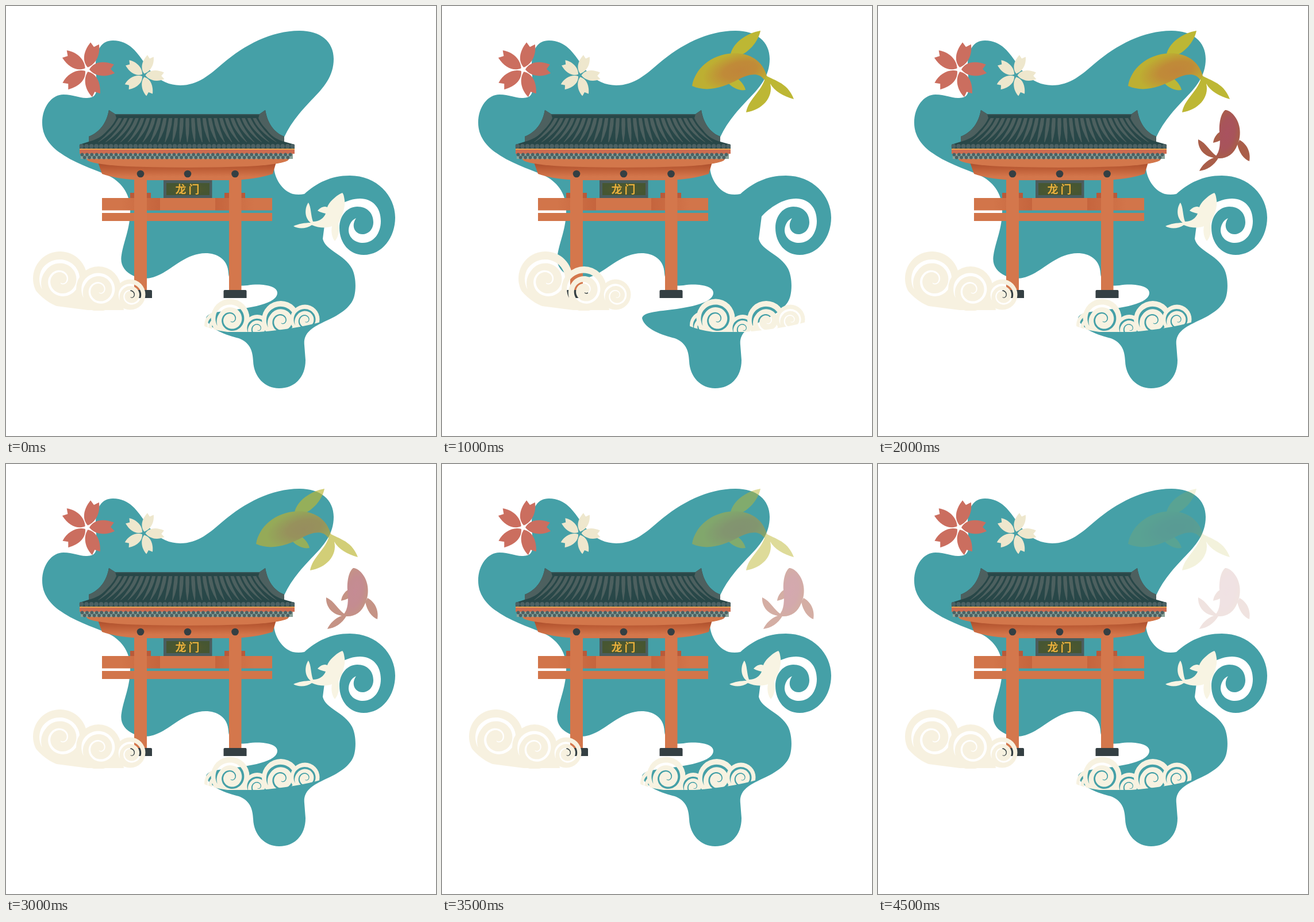
An HTML page for the animation above (5000 ms loop, 748 px wide and 748 px high).

```html
<!DOCTYPE html>
<html lang="zh">
<head>
<meta charset="utf-8">
<title>Gate and carp</title>
<style>
html, body { margin: 0; width: 100%; height: 100%; overflow: hidden; background: #fff; }
svg { display: block; width: 100vw; height: 100vh; }
.drift, .fish { animation: 5s step-end infinite; }
.drift { animation-name: drift; }
#cream { animation-name: cream; }
#red { animation-name: red; }
#gold { animation-name: gold; }
@keyframes drift {
  0%, 40%, 100% { transform: none; }
  10% { transform: translateX(33px); }
  20% { transform: translateX(86px); }
}
@keyframes cream { 0%, 40%, 100% { opacity: 1; } 10% { opacity: 0; } }
@keyframes red {
  0%, 20%, 100% { opacity: 0; }
  10%, 40% { opacity: 1; }
  50% { opacity: .833; } 60% { opacity: .667; } 70% { opacity: .5; }
  80% { opacity: .333; } 90% { opacity: .167; }
}
@keyframes gold {
  0%, 100% { opacity: 0; }
  20% { opacity: 1; }
  50% { opacity: .833; } 60% { opacity: .667; } 70% { opacity: .5; }
  80% { opacity: .333; } 90% { opacity: .167; }
}
</style>
</head>
<body>
<svg viewBox="0 0 748 748">
  <defs>
    <linearGradient id="under" x2="0" y2="1">
      <stop offset="0" stop-color="#a94c2b"/><stop offset=".35" stop-color="#bd5d36"/><stop offset=".8" stop-color="#d3764b"/>
    </linearGradient>
    <linearGradient id="shade">
      <stop offset="0" stop-color="#b7522f" stop-opacity="0"/><stop offset=".5" stop-color="#b7522f" stop-opacity=".8"/><stop offset="1" stop-color="#b7522f" stop-opacity="0"/>
    </linearGradient>
    <radialGradient id="plaque"><stop offset="0" stop-color="#55592b"/><stop offset="1" stop-color="#465632"/></radialGradient>
    <radialGradient id="goldBody" gradientUnits="userSpaceOnUse" cx="0" cy="0" r="1" gradientTransform="translate(518 112) rotate(-14) scale(66 32)">
      <stop offset="0" stop-color="#c0853a"/><stop offset=".45" stop-color="#c08b38"/><stop offset="1" stop-color="#bdaf32"/>
    </radialGradient>
    <radialGradient id="redBody" gradientUnits="userSpaceOnUse" cx="0" cy="0" r="1" gradientTransform="translate(607 222) rotate(12) scale(21 44)">
      <stop offset="0" stop-color="#a9525f"/><stop offset=".6" stop-color="#a8545a"/><stop offset="1" stop-color="#a85c4b"/>
    </radialGradient>
    <clipPath id="roofClip"><path d="M186 195H445C452 212 464 230 480 239H150C168 230 181 212 186 195Z"/></clipPath>
    <clipPath id="baseL"><path d="M40 420H250V530H150L88 522Q62 512 40 480Z"/></clipPath>
    <clipPath id="baseR"><path d="M340 500H550V549Q505 562 440 567H385Q362 564 345 557Z"/></clipPath>
  </defs>

  <path fill="#45a0a7" d="M186 60C215 60 229 82 243 102C260 127 280 138 303 138C334 138 355 119 377 100C416 67 462 43 511 43C547 43 570 62 570 92C570 122 553 142 531 164C510 186 494 206 484 228L466 280C467 300 480 321 499 327Q509 329 519 327
    C540 308 565 295 598 295C645 295 677 330 677 368C677 402 655 433 622 433C598 433 580 413 580 386C580 363 595 349 611 349C629 349 639 361 639 376C639 389 630 397 620 397C608 397 599 384 609 369
    C600 373 596 382 596 391C597 404 608 412 621 412C640 412 652 395 652 374C652 350 637 335 616 335C592 335 570 351 556 366L551 405
    C556 426 589 432 602 457C609 471 609 492 606 504C601 527 572 541 552 550C529 561 517 571 519 590L521 616C521 648 500 665 475 665C450 665 431 645 430 618C429 600 425 586 405 578C384 573 352 562 348 543C350 530 390 531 420 525C450 520 472 512 472 499C472 486 443 482 420 486C396 489 388 478 387 465C386 440 367 430 347 430C315 430 290 456 270 466C251 476 237 476 223 470C205 462 198 449 201 433C205 408 217 385 216 352C215 325 200 305 176 294C130 275 63 255 63 203C63 175 80 154 100 154C121 154 130 163 148 159C164 154 156 130 156 104C156 75 167 60 186 60Z"/>

  <g id="flowers"></g>

  <g id="gate">
    <path fill="#b85a3a" d="M216 325H252V335H216ZM380 325H416V335H380Z"/>
    <path fill="#d2754a" d="M167 334H463V355.500H167ZM167 360H463V374H167Z"/>
    <path fill="url(#shade)" d="M200 334H268V355.500H200ZM364 334H432V355.500H364Z"/>
    <path fill="#d4774c" d="M223 295H245V495H223ZM388 295H409.500V495H388Z"/>
    <path fill="#343f43" d="M216 508V496Q216 494 218 494H252Q254 494 254 496V508ZM378.500 508V496Q378.500 494 380.500 494H416.500Q418.500 494 418.500 496V508Z"/>
    <path fill="url(#under)" d="M160 272H470L464 292Q435 302 390 303H242Q194 302 167 292Z"/>
    <path fill="#d3774b" d="M138 264H494L490 269Q476 276 420 279Q316 283 212 279Q156 276 142 269Z"/>
    <g fill="#343f43"><circle cx="234" cy="292" r="6.300"/><circle cx="316" cy="292" r="6.300"/><circle cx="398.500" cy="292" r="6.300"/></g>
    <path fill="#4b5d5e" d="M274 303H358.500V334H274Z"/>
    <path fill="url(#plaque)" d="M279 308H354V329H279Z"/>
    <text x="294.500" y="325.500" font-size="19" letter-spacing="4" fill="#eab03c" font-weight="700" font-family="'Noto Sans CJK SC','Noto Sans CJK',sans-serif">龙门</text>
    <path fill="#8ca49b" d="M130 256H499V266H130Z"/>
    <path fill="#ce6c50" d="M128 249H502V257H128Z"/>
    <path fill="#e6a152" d="M128 247.500H502V250H128Z"/>
    <path fill="#284748" d="M179 181L190 188H441L451 181C455 204 466 220 484 227V236L502 241V248H128V241L144 236V227C164 219 175 203 179 181Z"/>
    <path fill="#4d605f" d="M179 181L190 188L192 195L187 195C181 214 169 230 144 236V227C164 219 175 203 179 181ZM451 181L441 188L439 195H444C450 214 461 230 484 236V227C466 220 455 204 451 181Z"/>
    <path fill="#365253" d="M190 188H441V190H190Z"/>
    <g id="tiles" clip-path="url(#roofClip)" fill="#4d605f"></g>
    <g id="dots" fill="#4c6163"></g>
  </g>

  <g class="drift"><g id="cloudL"></g></g>
  <g class="drift"><g id="cloudR"></g></g>

  <path id="cream" class="fish" fill="#f8f4e3" d="M585 325C577 328 562 340 559 350C552 347 546 352 542 356C547 359 552 360 556 361C553 369 545 375 534 375C530 364 531 350 526 342C520 350 518 368 530 377C520 377 508 379 500 383C508 388 522 388 532 381C545 387 560 386 567 383C565 392 567 403 572 409C578 402 581 392 578 378C585 366 591 348 589 338C588 330 587 327 585 325Z"/>

  <g id="red" class="fish">
    <path fill="#a95e49" d="M596 218C588 223 584 230 583 238C588 237 593 235 597 233ZM589 261C577 253 572 239 557 232C556 246 565 261 584 264C572 268 563 278 559 287C572 285 584 279 593 263ZM625 240C628 255 636 266 646 270C649 255 642 240 629 233Z"/>
    <path fill="url(#redBody)" d="M604 181C597 186 593 202 594 219C596 238 595 253 587 262L592 265C606 266 619 258 625 242C632 228 632 205 619 190C613 183 608 181 604 181Z"/>
  </g>

  <g id="gold" class="fish">
    <path fill="#bdb734" d="M502 84C506 64 530 47 554 43C550 63 532 83 513 88ZM498 134C506 143 518 148 528 146C526 138 521 132 514 126ZM561 119C573 129 601 131 612 162C594 157 578 148 571 135C577 160 556 181 529 185C533 163 553 151 561 129Z"/>
    <path fill="url(#goldBody)" d="M435 139C440 110 466 84 508 82C543 82 560 102 565 122L560 128C551 115 535 118 515 128C491 141 461 151 435 139Z"/>
  </g>
</svg>
<script>
const $ = id => document.getElementById(id);
const range = (n, f) => Array.from({ length: n }, (_, i) => f(i)).join('');
const circle = (x, y, r, fill) => `<circle cx="${x}" cy="${y}" r="${r}"${fill ? ` fill="${fill}"` : ''}/>`;

// Five notched petals around a centre
function flower(x, y, size, turn, fill) {
  const petal = 'M4 0C11 -12 27 -16 47 -8L41 0L48 7C32 15 13 12 4 0Z';
  return `<g transform="translate(${x} ${y}) scale(${size})" fill="${fill}">` +
    range(5, i => `<path d="${petal}" transform="rotate(${turn + i * 72})"/>`) + '</g>';
}

// Tapering spiral groove cut into a cloud puff
function groove(x, y, R) {
  const n = 90, outer = [], inner = [];
  for (let i = 0; i <= n; i++) {
    const t = i / n, a = 2.7 + t * 11.6;
    const r = R * (.78 - .68 * t ** 1.25);
    const w = R * .08 * (1 - t * .8) * Math.min(1, t * 12);
    const at = d => `${(x + R * .04 + d * Math.cos(a)).toFixed(1)} ${(y + R * .07 + d * Math.sin(a)).toFixed(1)}`;
    outer.push(at(r + w));
    inner.unshift(at(r - w));
  }
  return `<path d="M${outer.concat(inner).join('L')}Z"/>`;
}

function cloud(id, base, fill, puffs, body) {
  const shape = puffs.map(([x, y, r]) => circle(x, y, r, '#fff') + groove(x, y, r)).join('');
  $(id).innerHTML = `<mask id="${id}Mask" maskUnits="userSpaceOnUse" x="0" y="400" width="748" height="200">` +
    `<path fill="#fff" d="${body}"/>${shape}</mask>` +
    `<g clip-path="url(#${base})"><path fill="${fill}" mask="url(#${id}Mask)" d="M0 400H748V600H0Z"/></g>`;
}

$('flowers').innerHTML = flower(141, 110.5, 1, -73, '#cb6e5f') + flower(239.5, 120.5, .75, -70, '#eee7cd');

$('tiles').innerHTML = range(27, i => {
  const u = i / 13 - 1, top = 315.5 + u * 126, foot = 315.5 + u * 168, bend = 315.5 + u * 136;
  return `<path d="M${top - 2.8} 194H${top + 2.8}Q${bend + 4.5} 216 ${foot + .5} 237H${foot - .5}Q${bend - 4.5} 216 ${top - 2.8} 194Z"/>`;
});

$('dots').innerHTML =
  range(44, i => circle(131.5 + i * 8.53, 244, 3.9)) +
  range(44, i => circle(132.5 + i * 8.42, 258.5, 2.9)) +
  range(43, i => circle(136.7 + i * 8.42, 263.5, 2.9));

cloud('cloudL', 'baseL', '#f7f1e0', [[94, 474, 47], [161, 492, 39], [216, 502, 26.500]],
  'M62 500L120 500H200L205 529H130L85 522Z');
cloud('cloudR', 'baseR', '#f7f2e1', [[369, 555, 24], [390, 543, 33.500], [437, 560, 23], [478, 546, 33], [520, 545, 25.500]],
  'M375 558H530L440 567H385Z');
</script>
</body>
</html>
```
